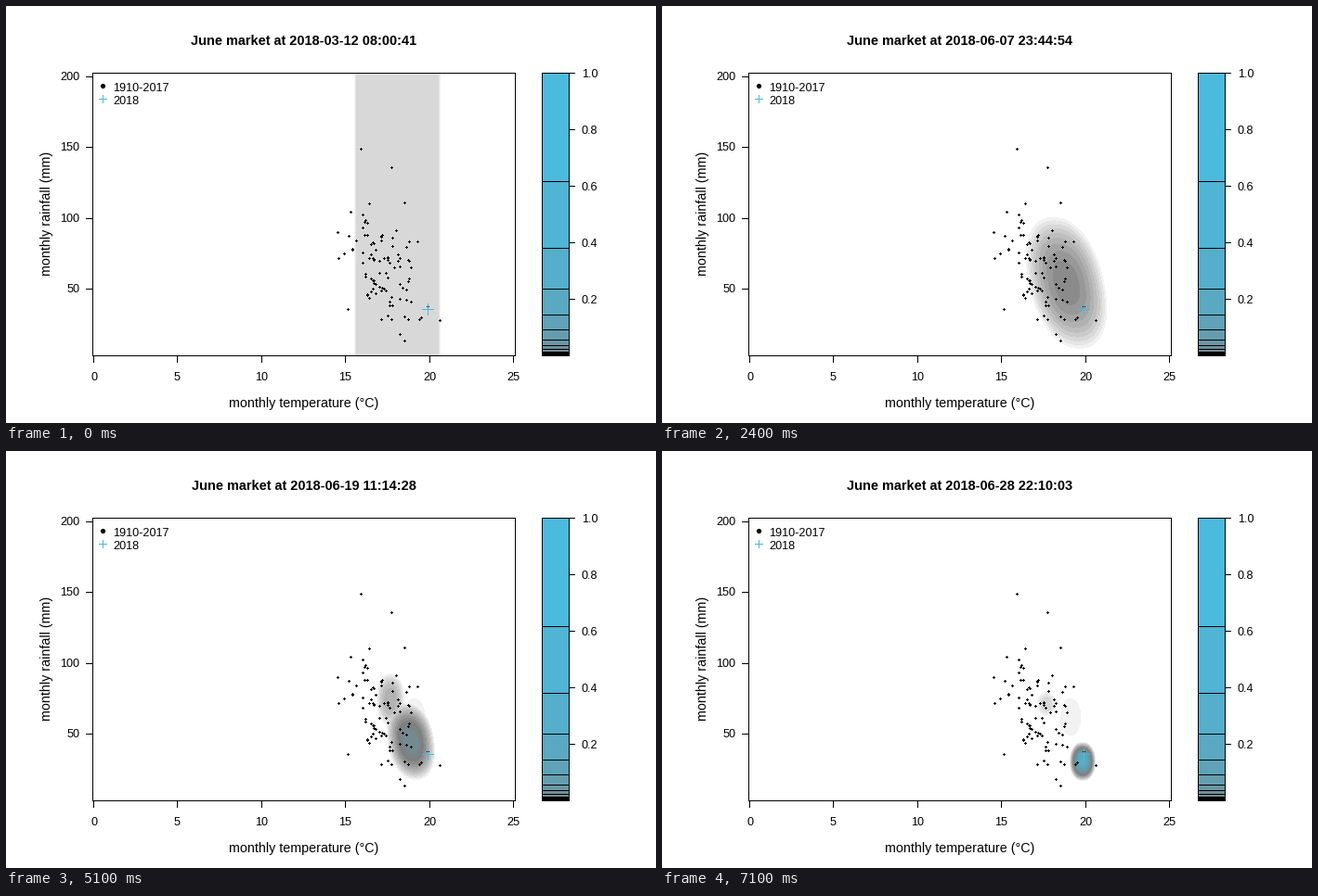
Write a matplotlib script that moves like this. It is 700 px wide and 450 px high and loops after 7.2 s.

```python
import numpy as np
import matplotlib.pyplot as plt
from matplotlib.animation import FuncAnimation
from matplotlib.collections import PolyCollection
from matplotlib.colors import LinearSegmentedColormap
from matplotlib.patches import Circle, Rectangle

W, H, FRAMES, STEP = 700, 450, 72, 100
PX = 0.72  # points per pixel at 100 dpi
BLUE = "#4bbadd"
RATIO = 0.616  # each density level is this share of the next

plt.rcParams["font.family"] = "Liberation Sans"
fig = plt.figure(figsize=(W / 100, H / 100), dpi=100, facecolor="white")
ax = fig.add_axes([0, 0, 1, 1])
ax.axis("off")

ramp = LinearSegmentedColormap.from_list("ramp", ["white", "#7f7f7f", BLUE])
palette = ramp(np.linspace(0, 1, 21))[:, :3]

# Pixels that the market covers
LEFT, RIGHT, TOP, BOTTOM = 350, 500, 73, 377
X, Y = np.meshgrid(np.arange(LEFT, RIGHT) + 0.5, np.arange(TOP, BOTTOM) + 0.5)

# Path of the forecast: centre and half height at a few moments
MOMENTS = [9, 17, 32, 40, 51, 58, 71]
CENTRE_X = [413, 436, 435, 435, 436, 449, 453]
CENTRE_Y = [263, 295, 303, 303, 313, 330, 335]
HALF_HEIGHT = [86, 72, 70, 70, 42, 28, 21]

CLOCK = {0: "2018-03-12T08:00:41", 9: "2018-04-30T10:15:08",
         17: "2018-06-04T06:47:08", 32: "2018-06-12T05:25:12",
         40: "2018-06-12T05:57:40", 51: "2018-06-19T11:14:28",
         58: "2018-06-24T10:24:00", 71: "2018-06-28T22:10:03"}
START = np.datetime64(CLOCK[0])
SECONDS = [int((np.datetime64(s) - START).astype(int)) for s in CLOCK.values()]


def x_px(temp):
    return 94.5 + 18.08 * temp


def y_px(rain):
    return 382 - 1.53 * rain


def blob(cx, cy, rx, ry, peak, tilt=0.0, power=2.2):
    """Hill that falls from its peak to level 1 at the given radii."""
    u = np.abs((X - cx - tilt * (Y - cy)) / rx)
    v = np.abs((Y - cy) / ry)
    return 1 + (peak - 1) * (1 - u**power - v**power)


def wall(left, right):
    return 1 + np.minimum(X - left, right - X)


def ramp_up(i, begin, end):
    return np.clip((i - begin) / (end - begin), 0, 1)


FLAT = np.clip(wall(375.5, 467.5), -2, 3.5)
PLATES = np.maximum.reduce([
    blob(398.5, 244, 23, 110, 1.9, power=12),
    blob(418.5, 262, 43, 91, 1.9, power=12),
    blob(419, 263, 42.5, 87, 2.9, power=24),
    blob(440, 303, 25, 45, 1.9, power=6),
])


def levels_at(i):
    opening, settling = ramp_up(i, 0, 8), ramp_up(i, 9, 17)
    focus, fade = ramp_up(i, 40, 71), 1 - ramp_up(i, 51, 71)
    cx, cy, ry = (np.interp(i, MOMENTS, row)
                  for row in (CENTRE_X, CENTRE_Y, HALF_HEIGHT))
    bell = blob(cx, cy, 3 + 0.53 * ry, ry, 9.8 + 8.7 * focus,
                0.2 * settling * (1 - focus) + 0.12 * (1 - settling))
    lobe = blob(414, 273 - 5 * fade, 10 + 5 * fade, 13 + 15 * fade,
                4 + 3 * fade)
    wisp = blob(440, 287, 11, 20, 1.1 + 4 * np.exp(-((i - 58) / 4) ** 2))
    hills = np.maximum.reduce([PLATES - 3 * settling, bell, lobe, wisp])
    hills = np.minimum(hills, wall(375.5, 468 + 12 * settling))
    return FLAT + (np.clip(hills, -2, 20) - FLAT) * opening


def picture_at(i):
    return palette[np.clip(np.floor(levels_at(i)), 0, 20).astype(int)]


def title_at(i):
    secs = int(round(np.interp(i, list(CLOCK), SECONDS)))
    stamp = str(START + np.timedelta64(secs, "s")).replace("T", " ")
    return "June market at " + stamp


def bars(boxes, color="black", z=3):
    """Fill boxes (x, y, width, height) that lie on whole pixels."""
    polys = [[(x, y), (x + w, y), (x + w, y + h), (x, y + h)]
             for x, y, w, h in boxes]
    ax.add_collection(PolyCollection(polys, facecolors=color, linewidths=0,
                                     snap=False, zorder=z), autolim=False)


def frame(x0, y0, x1, y1):
    w, h = x1 - x0 + 1, y1 - y0 + 1
    bars([(x0, y0, w, 1), (x0, y1, w, 1), (x0, y0, 1, h), (x1, y0, 1, h)])


def crosses(points, arm, color="black", z=4):
    size = 2 * arm + 1
    bars([box for x, y in points
          for box in ((x - arm, y, size, 1), (x, y - arm, 1, size))], color, z)


def label(x, y, text, size=12.6, ha="left", va="baseline", **kw):
    return ax.text(x, y, text, fontsize=size * PX, ha=ha, va=va, **kw)


image = ax.imshow(picture_at(0), extent=(LEFT, RIGHT, BOTTOM, TOP),
                  interpolation="nearest", aspect="auto", zorder=1)
ax.set_xlim(0, W)
ax.set_ylim(H, 0)

# Plot frame and axes
frame(93, 72, 548, 377)
for temp in range(0, 26, 5):
    x = int(x_px(temp))
    bars([(x, 378, 1, 7)])
    label(x + 0.5, 404, str(temp), ha="center")
for rain in range(50, 201, 50):
    y = int(y_px(rain))
    bars([(86, y, 7, 1)])
    label(79.5, y + 4, str(rain), ha="right")
label(321, 433, "monthly temperature (°C)", 14.2, "center")
label(51, 223.5, "monthly rainfall (mm)", 14.2, "right", "center", rotation=90)
title = label(320.5, 42, title_at(0), 14.5, "center", weight="bold")

# Yearly records: a cloud where warm months are dry, and a few odd years
rng = np.random.default_rng(1910)
temps = np.clip(rng.normal(17.3, 1.0, 90), 14.8, 19.7).round(1)
rains = 69 - 11 * (temps - 17.3) + rng.normal(0, 20, 90)
years = list(zip(temps, np.clip(rains, 29, 125)))
years += [(15.9, 149), (17.7, 136), (15.1, 36), (20.6, 28), (19.9, 38),
          (18.2, 18), (18.5, 14), (14.5, 90), (14.6, 72)]
crosses([(round(x_px(t)), round(y_px(r))) for t, r in years], 1)
crosses([(454, 327)], 6, BLUE, 5)

# Legend
ax.add_patch(Circle((104.5, 86.5), 2.6, lw=0, color="black", zorder=3))
label(115, 92, "1910-2017")
crosses([(104, 100)], 4, BLUE)
label(115, 106, "2018")

# Colour key
for k in range(20):
    high, low = (int(377 - 305 * RATIO**n) for n in (k, k + 1))
    ax.add_patch(Rectangle((577, high), 30, low - high, lw=0, snap=False,
                           color=palette[20 - k], zorder=2))
    bars([(577, low, 30, 1)])
frame(577, 72, 606, 377)
for value in (0.2, 0.4, 0.6, 0.8, 1.0):
    y = int(377 - 305 * value)
    bars([(607, y, 6, 1)])
    label(620, y + 5, f"{value:.1f}")


def draw(i):
    image.set_data(picture_at(i))
    title.set_text(title_at(i))
    return image, title


anim = FuncAnimation(fig, draw, frames=FRAMES, interval=STEP, repeat=True,
                     repeat_delay=0, blit=False)
plt.show()
```
